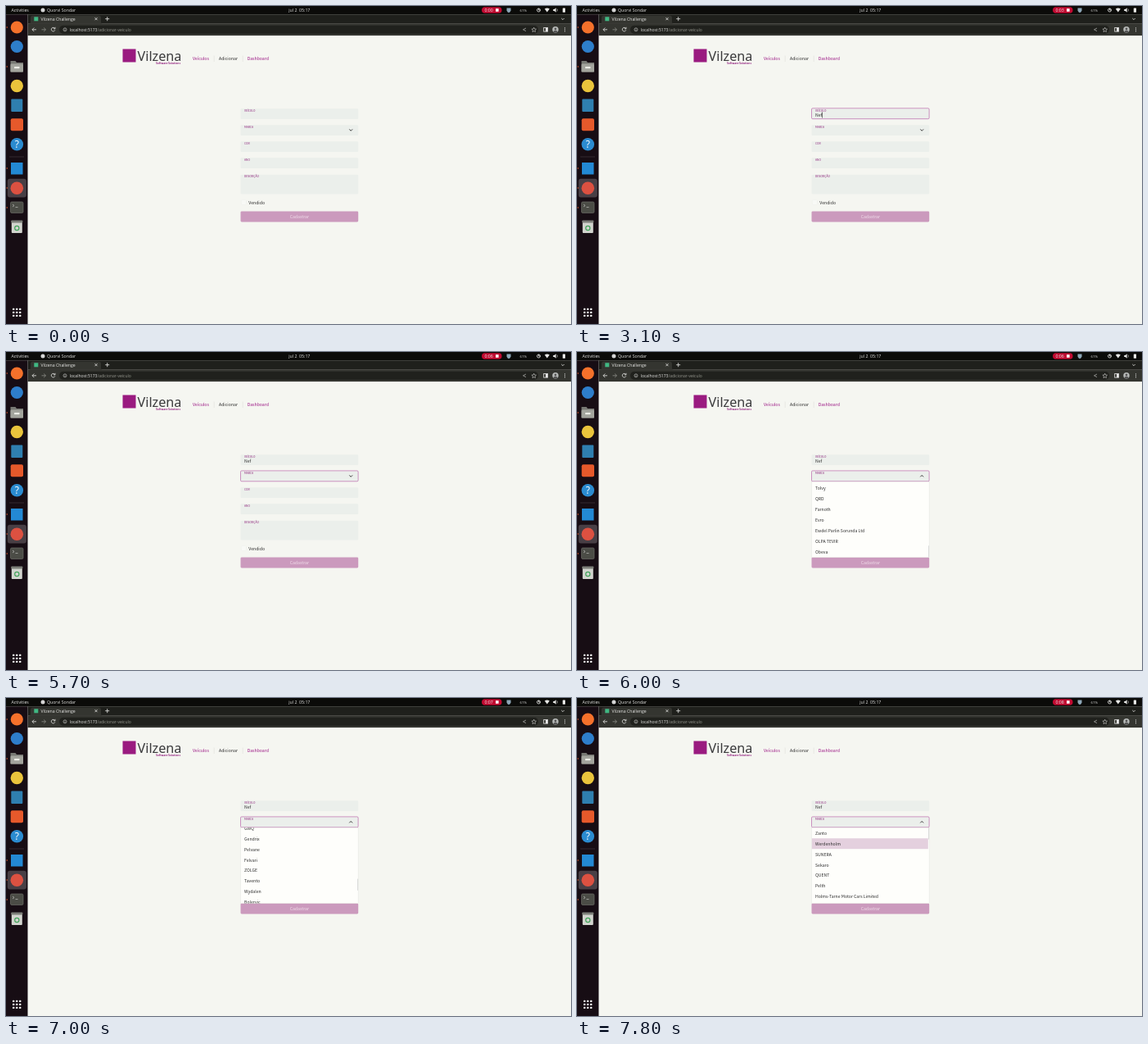
An HTML page that plays this animation: 690 by 388 pixels, repeating every 8 s.

```html
<!DOCTYPE html>
<html lang="pt">
<head>
<meta charset="utf-8">
<title>Adicionar veículo</title>
<style>
  html, body { margin: 0; width: 100%; height: 100%; overflow: hidden; background: #f5f6f1; }
  svg { display: block; width: 100vw; height: 100vh; }
  text { white-space: pre; }
  .ui { font: 500 5.2px "Open Sans", "Noto Sans", sans-serif; fill: #e8e8e6; }
  .page { font: 5.15px "Noto Sans CJK JP", "Noto Sans CJK SC", "Noto Sans", sans-serif; fill: #2c2c2c; }
  .label { font-size: 3.3px; font-weight: 500; fill: #8a1a76; }
  .tagline { font-size: 3.2px; font-weight: 700; fill: #92207f; }
  .link { fill: #9a1483; }
  .line { fill: none; stroke: #d6d6d4; stroke-width: .9; }
  .thin { stroke-width: .6; }
  .focus { fill: none; stroke: #b050a0; stroke-width: .6; }
  .field { fill: #ebefeb; }
  .hover { fill: #e4d0de; }
</style>
</head>
<body>
<svg viewBox="0 0 690 388" preserveAspectRatio="none">
  <defs>
    <clipPath id="listClip"><rect x="286" y="158.2" width="144" height="92.2"/></clipPath>
    <clipPath id="avatarClip"><circle cx="671" cy="28.8" r="3.7"/></clipPath>
  </defs>
  <rect width="690" height="388" fill="#f5f6f1"/>

  <!-- desktop bar -->
  <rect width="690" height="10.2" fill="#0b0b09"/>
  <g class="ui">
    <text x="6.5" y="6.8">Activities</text>
    <circle cx="45" cy="4.9" r="2.5" fill="#d5d5d5"/>
    <text x="50" y="6.8">Quorvi Sondar</text>
    <text x="358.3" y="6.8" text-anchor="middle">jul 2  05:17</text>
    <rect x="581" y="1.2" width="24.5" height="7.6" rx="3.8" fill="#c10a31"/>
    <text id="timer" x="584.5" y="6.8"></text>
    <rect x="598" y="3.2" width="3.6" height="3.6" fill="#fff"/>
    <path d="M611.5 2.5h5v3q-.6 2-2.5 2.8q-1.9-.8-2.5-2.8z" fill="#8da7b8"/>
    <text x="627.5" y="6.7" font-size="4.3">61%</text>
    <circle cx="650.5" cy="5" r="2" class="line"/><path d="M650.5 3v2h2" class="line"/>
    <path d="M657.8 3.6q3-2.4 6 0l-3 4z"/>
    <path d="M668.2 4h1.4l2-1.8v5.6l-2-1.8h-1.4z"/>
    <path d="M672.8 3.3q1.4 1.7 0 3.4" class="line thin"/>
    <rect x="679.8" y="2.6" width="3.2" height="5.2" rx=".5"/>
  </g>

  <!-- dock -->
  <rect y="10.2" width="26.5" height="377.8" fill="#170d14"/>
  <rect x="1.8" y="210.8" width="23" height="22.8" rx="3" fill="#483f45"/>
  <path d="M4 184h18" stroke="#493f46" stroke-width=".6"/>
  <circle cx="13.3" cy="26" r="7.6" fill="#f5712b"/>
  <circle cx="13.3" cy="49.5" r="7.6" fill="#2e7ecb"/>
  <path d="M5.5 67h6l1.5 2h8v11.5h-15.5z" fill="#777873"/>
  <rect x="5.5" y="70.5" width="15.5" height="10" rx="1.2" fill="#a3a49d"/>
  <rect x="10" y="74" width="6.5" height="2.2" rx=".6" fill="#ecece6"/>
  <circle cx="13.3" cy="97.5" r="7.7" fill="#eac43c"/>
  <rect x="6.3" y="113.5" width="14" height="15.5" rx="1" fill="#2f7fb0"/>
  <rect x="5.7" y="137.3" width="15.3" height="15" rx="2" fill="#e6592b"/>
  <circle cx="13.3" cy="168.7" r="7.8" fill="#2b8bd0"/>
  <text class="ui" x="13.3" y="173" text-anchor="middle" style="font-size:12px;fill:#fff">?</text>
  <rect x="6" y="191" width="14.5" height="14.5" fill="#2389d4"/>
  <circle cx="13.3" cy="222.3" r="7.8" fill="#dc5141"/>
  <rect x="5.5" y="239" width="15.5" height="13.5" rx="1.5" fill="#4b4c46" stroke="#6c6e66" stroke-width=".7"/>
  <path d="M8 242l2 1.5l-2 1.5m3.5 .5h3" class="line thin"/>
  <rect x="6.8" y="263" width="13" height="14" rx="1" fill="#d2d4ce"/>
  <rect x="6.3" y="261.5" width="14" height="3" rx=".8" fill="#7d7f79"/>
  <circle cx="13.3" cy="271" r="2.6" fill="none" stroke="#43a35b" stroke-width="1.2"/>
  <g id="dock"></g>

  <!-- browser frame -->
  <rect x="26.5" y="10.2" width="663.5" height="11.5" fill="#1f201c"/>
  <path d="M28 21.7q2 0 2-2v-5.5q0-2.500 2.500-2.500h81q2.500 0 2.500 2.500v5.500q0 2 2 2z" fill="#343530"/>
  <rect x="26.5" y="21.5" width="663.5" height="14.6" fill="#343530"/>
  <rect x="65" y="23.7" width="585" height="10.2" rx="5.1" fill="#20211d"/>
  <rect x="34.3" y="13.3" width="5" height="5" fill="#41b883"/>
  <g class="ui">
    <text x="42.5" y="17.7">Vilzena Challenge</text>
    <text x="77.7" y="30.7" font-size="5">localhost:5173<tspan fill="#96978f">/adicionar-veiculo</tspan></text>
  </g>
  <g class="line">
    <path d="M108.5 14.2l3 3m0-3l-3 3M121.2 15.7h5m-2.5-2.5v5M678.3 15l1.7 1.7l1.7-1.7"/>
    <path d="M37 28.8h-5m2.3-2.3l-2.3 2.3l2.3 2.3"/>
    <path d="M43.5 28.8h5m-2.3-2.3l2.3 2.3l-2.3 2.3" stroke="#85867f"/>
    <path d="M59.6 27.4a2.3 2.3 0 1 0 .2 2M60 25.8v2h-2"/>
    <g class="thin">
      <circle cx="72" cy="28.8" r="2"/><path d="M72 28.5v1.5m0-2.5v.4"/>
      <path d="M635 27l-3.500 1.800l3.500 1.800"/>
      <path d="M644.7 26.2l.8 1.8l2 .2l-1.5 1.400l.4 2l-1.7-1l-1.7 1l.4-2l-1.5-1.400l2-.2z"/>
    </g>
    <rect x="656.7" y="26.5" width="4.8" height="4.6"/>
  </g>
  <g fill="#e4e4e4">
    <rect x="659" y="26.5" width="2.5" height="4.6"/>
    <circle cx="682.5" cy="26.8" r=".6"/><circle cx="682.5" cy="28.8" r=".6"/><circle cx="682.5" cy="30.8" r=".6"/>
  </g>
  <g clip-path="url(#avatarClip)">
    <rect x="667" y="25" width="8" height="8" fill="#b9bcba"/>
    <circle cx="671" cy="28" r="1.4" fill="#555"/>
    <ellipse cx="671" cy="32.5" rx="2.8" ry="2.7" fill="#555"/>
  </g>

  <!-- page header -->
  <rect x="142.5" y="52.5" width="16" height="16" fill="#9a1b80"/>
  <text x="160.5" y="66.8" style="font:500 16.2px 'Noto Sans','Open Sans',sans-serif;fill:#3b3b3d">Vilzena</text>
  <g class="page">
    <text x="183" y="71" class="tagline">Software Solutions</text>
    <text x="228" y="66.1" class="link">Veículos</text>
    <text x="260" y="66.1">Adicionar</text>
    <text x="294.7" y="66.1" class="link">Dashboard</text>
  </g>
  <path d="M254.2 60.5v7.5M289.2 60.5v7.5" stroke="#dfe0dc" stroke-width=".6"/>

  <!-- form -->
  <g class="page">
    <g id="fields"></g>
    <text id="vehicle" x="291" y="135.3"></text>
    <rect id="caret" y="129.5" width=".6" height="7" fill="#222"/>
    <rect id="vehicleFocus" class="focus" x="286.5" y="124.8" width="143.6" height="12.9" rx="1.3"/>
    <rect id="brandFocus" class="focus" x="286.5" y="144.900" width="143.6" height="12.9" rx="1.3"/>
    <path id="chevron" fill="none" stroke="#3a3a3a"/>
    <rect x="287.3" y="236.5" width="6" height="6" rx="1" fill="#f8f9f6" stroke="#eceeea" stroke-width=".5"/>
    <text x="296.3" y="241.6">Vendido</text>
    <rect x="286.5" y="250.4" width="143.7" height="13" rx="1.3" fill="#cb9abd"/>
    <text x="358.3" y="258.9" text-anchor="middle" style="fill:#f1dfeb">Cadastrar</text>

    <g id="menu">
      <rect x="286.5" y="158.2" width="143.6" height="92.2" fill="#fefefb" stroke="#dfe0dc" stroke-width=".4"/>
      <g clip-path="url(#listClip)">
        <g id="list"><rect id="hover" class="hover" x="286.8" width="142" height="12.95"/></g>
      </g>
      <rect id="thumb" x="429.1" width=".8" height="14.2" fill="#d3d5d2"/>
    </g>
  </g>
</svg>
<script>
const LOOP = 8000, ROW = 12.95, LIST_TOP = 158.3, LIST_HEIGHT = 92.2, THUMB_HEIGHT = 14.2;
const FIRST_HOVER_ROW = 38, LAST_HOVER_ROW = 1;
const brands = [
  'Zanto', 'Werdenholm', 'SUNERA', 'Sekaro', 'QUENT', 'Pelth', 'Holms-Tarne Motor Cars Limited',
  'RUV', 'Pordane', 'Polvera', 'Oltmarine', 'Nistrad', 'MORVI', 'Mirgolan', 'Mencarto-Belz', 'Tarvenic',
  'NURDA', 'VOLTERBI', 'Farwend', 'PRYNO', 'Moor Tiven', 'Tarbonzelli', 'ZOU MOTORS CORPORATION', 'Yopp',
  'JANGOR', 'ISTURO', 'Invendia', 'Olhestra', 'Hovarda', 'GWQ', 'Gendrix', 'Pelvane', 'Felvari', 'ZOLGE',
  'Tavento', 'Wydalen', 'Bolervic', 'Tolvy', 'QRD', 'Farnoth', 'Evro', 'Ewdel Parlin Sorunda Ltd',
  'OLPA TEVIR', 'Obeva'
];
const maxScroll = brands.length * ROW - LIST_HEIGHT;

const $ = id => document.getElementById(id);
function add(parent, tag, attrs, text = '') {
  const node = document.createElementNS('http://www.w3.org/2000/svg', tag);
  for (const key in attrs) node.setAttribute(key, attrs[key]);
  node.textContent = text;
  return $(parent).appendChild(node);
}
const show = (id, on) => $(id).setAttribute('visibility', on ? 'visible' : 'hidden');

for (const y of [26, 74, 198, 222, 246]) add('dock', 'circle', { cx: 1.3, cy: y, r: .8, fill: '#d9552f' });
for (let i = 0; i < 9; i++)
  add('dock', 'rect', { x: 8 + i % 3 * 4, y: 368.7 + Math.floor(i / 3) * 4, width: 2.4, height: 2.4, rx: .7, fill: '#f0f0f0' });

[['VEÍCULO', 125.2], ['MARCA', 145.2], ['COR', 165.2], ['ANO', 185.2], ['DESCRIÇÃO', 205.8, 23.8]]
  .forEach(([name, y, height = 12.8]) => {
    add('fields', 'rect', { class: 'field', x: 286.5, y, width: 143.7, height, rx: 1.3 });
    add('fields', 'text', { class: 'label', x: 291, y: y + 3.4 }, name);
  });
brands.forEach((name, i) => add('list', 'text', { x: 291, y: (i + .5) * ROW + 1.9 }, name));

function draw(time) {
  const t = Math.floor(time / 100) * 100;
  const open = t >= 5900;
  const typed = 'Nef'.slice(0, Math.max(0, (t - 2800) / 100));
  const typing = t >= 800 && t < 3600;

  $('timer').textContent = '0:0' + Math.floor((t + 400) / 1000);
  $('vehicle').textContent = typed;
  $('caret').setAttribute('x', 291 + (typed ? $('vehicle').getComputedTextLength() : 0));
  show('caret', typing && (t >= 2900 || (t - 800) % 1200 < 600));
  show('vehicleFocus', typing);
  show('brandFocus', t >= 3600);
  $('chevron').setAttribute('d', open ? 'M419.3 152.3l1.9-1.9l1.9 1.9' : 'M419.3 150.4l1.9 1.9l1.9-1.9');

  const progress = Math.min(1, Math.max(0, (t - 6800) / 600));
  const remaining = 1 - progress ** 1.46;
  show('menu', open);
  $('list').setAttribute('transform', `translate(0 ${LIST_TOP - remaining * maxScroll})`);
  $('thumb').setAttribute('y', LIST_TOP + remaining * (LIST_HEIGHT - THUMB_HEIGHT));

  const hoverFirst = t >= 6300 && t < 6900, hoverLast = t >= 7800;
  $('hover').setAttribute('y', ROW * (hoverLast ? LAST_HOVER_ROW : FIRST_HOVER_ROW));
  $('hover').setAttribute('opacity', hoverLast || hoverFirst ? (t === 6300 ? .6 : 1) : 0);
}

const start = performance.now();
function frame() {
  draw((performance.now() - start) % LOOP);
  requestAnimationFrame(frame);
}
frame();
</script>
</body>
</html>
```
